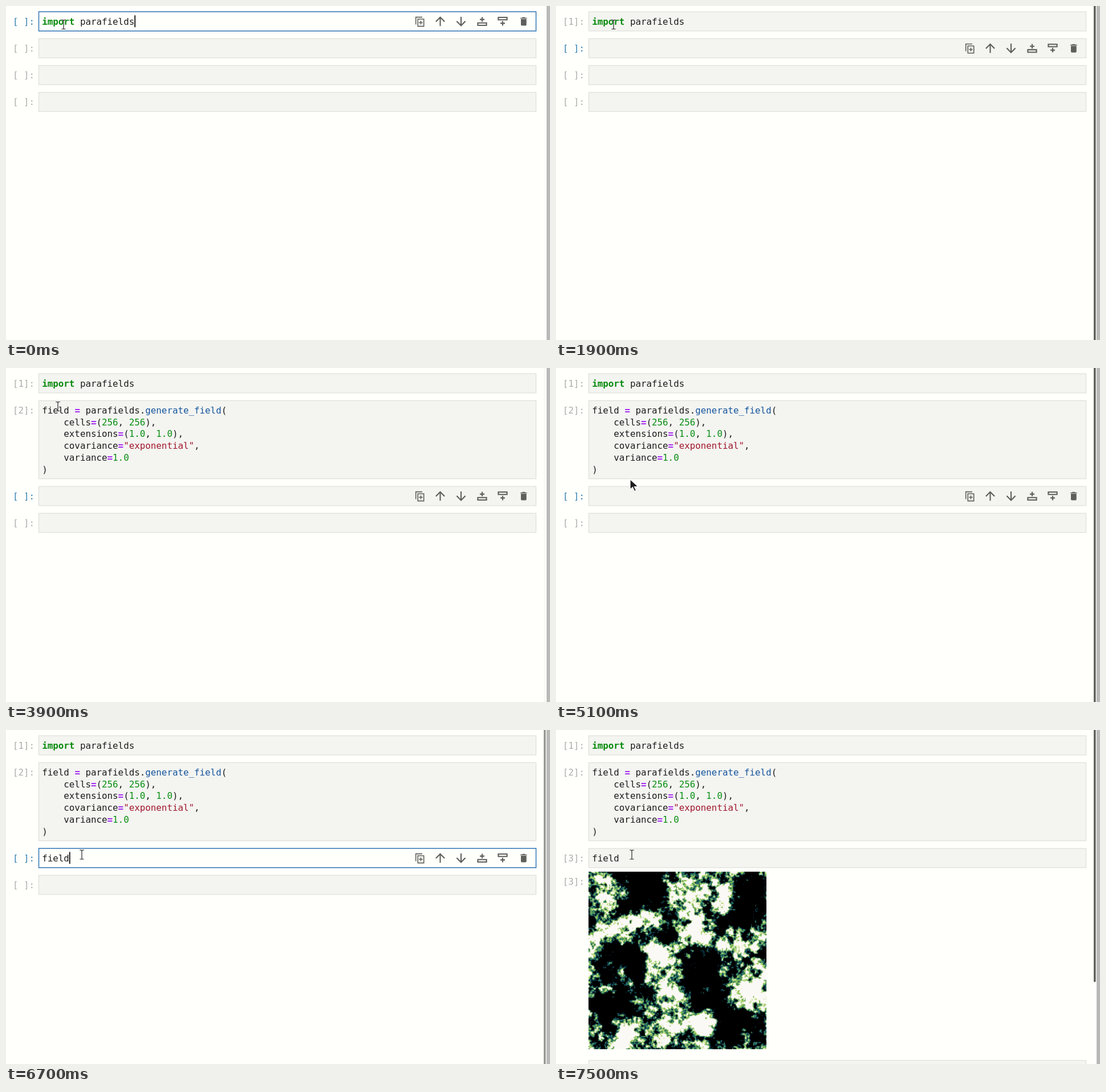
An HTML page with a canvas that plays this animation: 954 by 587 pixels, repeating every 8 s.

```html
<!DOCTYPE html>
<html lang="en">
<head>
<meta charset="utf-8">
<title>Notebook</title>
<style>
html, body { margin: 0; width: 100%; height: 100%; overflow: hidden; background: #fffffc; }
svg { position: absolute; left: 0; top: 0; }
canvas { position: absolute; left: 57px; top: 248.5px; width: 312px; height: 312px; }
text { font: 15.84px "DejaVu Sans Mono", monospace; white-space: pre; fill: #1c1c1b; }
.key { fill: #078a0c; font-weight: bold; }
.op { fill: #a01df0; font-weight: bold; }
.num { fill: #098f12; }
.str { fill: #a0182b; }
.fn { fill: #14559c; }
.match { fill: #0cab1c; }
.prompt { fill: #adadab; }
.prompt.on { fill: #307fb0; }
</style>
</head>
<body>
<canvas id="plot" width="256" height="256"></canvas>
<svg id="stage" width="954" height="587" viewBox="0 0 954 587"></svg>
<script>
const LOOP = 8000, STEP = 100;
const CHAR = 9.537, LINE = 20.72, PAD = 34.7, GAP = 12.5, LEFT = 63.2, BASE = 23.1;
const KEYS = [6200, 6300, 6400, 6600, 6700];
const stage = document.getElementById('stage');
const plot = document.getElementById('plot');

const span = (cls, s) => `<tspan class="${cls}">${s}</tspan>`;
const within = (t, a, b) => t >= a && t < b;
const rect = (x, y, w, h, attrs) =>
  `<rect x="${x}" y="${y}" width="${w}" height="${h}" ${attrs}/>`;

function callLines(matched) {
  const paren = s => matched ? span('match', s) : s;
  const eq = span('op', '=');
  const pair = n => `(${span('num', n)}, ${span('num', n)}),`;
  return [
    `field ${eq} parafields.${span('fn', 'generate_field')}${paren('(')}`,
    `    cells${eq}${pair('256')}`,
    `    extensions${eq}${pair('1.0')}`,
    `    covariance${eq}${span('str', '"exponential"')},`,
    `    variance${eq}${span('num', '1.0')}`,
    paren(')')
  ];
}

const plus = (x, y, r) => `M${x - r} ${y}h${2 * r}M${x} ${y - r}v${2 * r}`;
const box = (x, y, w, h) => `M${x} ${y}h${w}v${h}h${-w}z`;
const shaft = (x, from, to) => `M${x} ${from}V${to}m-7.6 ${(from - to) / 2}L${x} ${to}l7.6 ${(from - to) / 2}`;
const TOOLS = `
  <g fill="none" stroke="#5e5e5b" stroke-width="2.1">
    <path d="M718.7 15.6V2.8H730${box(722.3, 6.2, 10.4, 12.6)}${plus(727.5, 12.5, 3.3)}" stroke-width="1.6"/>
    <path d="${shaft(761.5, 18.5, 2.9)}${shaft(798, 2.1, 17.7)}"/>
    <path d="${box(827.4, 12.9, 15.2, 4.3)}${plus(835, 6.8, 4)}"/>
    <path d="${box(863.4, 3.2, 15.2, 4.3)}${plus(871, 13.6, 4)}"/>
  </g>
  <path transform="translate(898.1 .6) scale(.8125)" fill="#5e5e5b"
    d="M6 19q0 2 2 2h8q2 0 2-2V7H6zM19 4h-3.5l-1-1h-5l-1 1H5v2h14z"/>`;

const IBEAM_PATH = 'M-3.8 -8.5H-1.2L0 -7.3L1.2 -8.5H3.8M0 -7.5V7.3M-3.6 7.5H3.6';
const IBEAM = `<path d="${IBEAM_PATH}" fill="none" stroke="#fff" stroke-opacity=".6" stroke-width="2.4"/>
  <path d="${IBEAM_PATH}" fill="none" stroke="#222" stroke-width="1.2"/>`;
const ARROW = `<path d="M0 0V18L4.4 14L7.6 21L10.6 19.6L7.4 13H14Z"
  fill="#1c1c1c" stroke="#fff" stroke-width="1.2"/>`;

// time, x, y
const PATH = [
  [1900, 101, 33], [2100, 91, 68], [4600, 91, 68],
  [5100, 130, 195.6], [5400, 133, 217], [5500, 133, 217], [5600, 133, 219.5]
];

function pointer(t) {
  let [, x, y] = PATH[0];
  for (let i = 1; i < PATH.length; i++) {
    const [t0, x0, y0] = PATH[i - 1], [t1, x1, y1] = PATH[i];
    if (t < t0) break;
    const k = Math.min(1, (t - t0) / (t1 - t0));
    x = x0 + (x1 - x0) * k;
    y = y0 + (y1 - y0) * k;
  }
  const between = within(y, 44.5, 56.8) || within(y, 195.4, 207.6);
  return `<g transform="translate(${x} ${y})">${between ? ARROW : IBEAM}</g>`;
}

// The bar shows on pointer moves and fades out once it rests
function scrollAlpha(t) {
  if (t < 1900) return 0;
  const fade = start => Math.max(.2, 1 - Math.max(0, t - start) / 500) ** 2;
  return t < 4700 ? fade(3500) : t < 7500 ? fade(6600) : 1;
}

function prompt(y, mark, on) {
  return `<text class="prompt${on ? ' on' : ''}" x="12" y="${y}">[${mark}]:</text>`;
}

function cell(top, lines, mark, on, edit, caret) {
  const h = PAD + (lines.length - 1) * LINE;
  const look = edit
    ? 'fill="#fffffc" stroke="#3b7cb8" stroke-width="1.6"'
    : 'fill="#f4f4f1" stroke="#dedfdb" stroke-width="1.2"';
  let out = rect(57.5, top + .5, 872, h - .9, look) + prompt(top + BASE, mark, on);
  lines.forEach((s, i) => {
    out += `<text x="${LEFT}" y="${top + BASE + i * LINE}">${s}</text>`;
  });
  if (on) out += `<g transform="translate(0 ${top + 7.2})">${TOOLS}</g>`;
  if (caret) {
    const [row, col] = caret;
    out += rect(LEFT + col * CHAR, top + 6.8 + row * LINE, 1.7, 20.8, 'fill="#000"');
  }
  return out;
}

function render(t) {
  const runs = [100, 3700, 7300], ends = [600, 3800, 7500];
  const active = runs.filter(r => t >= r).length;
  const edit = t < 100 || within(t, 2400, 3700) || within(t, 5400, 7300);
  const blink = !within(t, 3100, 3600) && !within(t, 6000, 6200) && t < 7200;
  const typed = KEYS.filter(k => t >= k).length;
  const pasted = t >= 2500, done = t >= 7500;
  const mark = i => t >= ends[i] ? i + 1 : t >= runs[i] ? '*' : ' ';
  const cells = [
    [[span('key', 'import') + ' parafields'], [0, 17]],
    [pasted ? callLines(within(t, 2600, 3700)) : [''], pasted ? [5, 1] : [0, 0]],
    [['field'.slice(0, typed)], [0, typed]],
    [[''], [0, 0]]
  ];
  let top = 9.6, out = '';
  cells.forEach(([lines, caret], i) => {
    if (i === 3 && done) top += 325.4;
    const on = i === active;
    out += cell(top, lines, mark(i), on, on && edit, on && edit && blink && caret);
    top += PAD + (lines.length - 1) * LINE + GAP;
  });
  if (done) out += prompt(271.9, '3', false);
  plot.style.visibility = done ? 'visible' : 'hidden';
  out += rect(943, -4, 3.6, done ? 447 : 595, `rx="1.8" fill="#5f5f5c" opacity="${scrollAlpha(t)}"`);
  out += rect(948, 0, 6, 587, 'fill="#b9b9b8"');
  stage.innerHTML = out + pointer(t);
}

// Centres of the main bright and dark patches
const BRIGHT = [[298, 290], [240, 335], [80, 350], [290, 370], [175, 387],
  [197, 462], [258, 515], [130, 538], [350, 455]];
const DARK = [[160, 268], [335, 302], [110, 400], [255, 443], [90, 472], [310, 530]];

function hash(x, y, seed) {
  let h = Math.imul(x, 374761393) ^ Math.imul(y, 668265263) ^ Math.imul(seed, 1274126177);
  h = Math.imul(h ^ (h >>> 13), 1103515245);
  h = Math.imul(h ^ (h >>> 15), 2246822519);
  return ((h ^ (h >>> 16)) >>> 0) / 2147483648 - 1;
}

function noise(x, y, size) {
  const ix = Math.floor(x / size), iy = Math.floor(y / size);
  const smooth = v => v * v * (3 - 2 * v);
  const u = smooth(x / size - ix), v = smooth(y / size - iy);
  const row = j => hash(ix, iy + j, size) * (1 - u) + hash(ix + 1, iy + j, size) * u;
  return row(0) * (1 - v) + row(1) * v;
}

// Black, navy, teal, green, tan, white
function ramp(v) {
  v = Math.min(1, Math.max(0, v));
  return [251 * v ** 1.7, 249 * v ** .75, 246 * v ** 5 + 700 * v * (1 - v) ** 2];
}

function drawField() {
  const ctx = plot.getContext('2d'), img = ctx.createImageData(256, 256);
  for (let y = 0; y < 256; y++) for (let x = 0; x < 256; x++) {
    const px = 57 + x * 1.21875, py = 248.5 + y * 1.21875;
    const bumps = (list, r) => list.reduce((sum, [cx, cy]) =>
      sum + Math.exp(-((px - cx) ** 2 + (py - cy) ** 2) / (r * r)), 0);
    let v = .1 + .8 * bumps(BRIGHT, 21) - .9 * bumps(DARK, 34);
    for (let size = 24, amp = .55; size >= 1; size /= 2, amp *= .8) v += amp * noise(x, y, size);
    img.data.set([...ramp(v / .5), 255], (y * 256 + x) * 4);
  }
  ctx.putImageData(img, 0, 0);
}

drawField();
let shown = -1;
const begin = performance.now();
function tick(now) {
  const t = Math.floor((Math.max(0, now - begin) % LOOP) / STEP) * STEP;
  if (t !== shown) render(shown = t);
  requestAnimationFrame(tick);
}
render(0);
requestAnimationFrame(tick);
</script>
</body>
</html>
```
